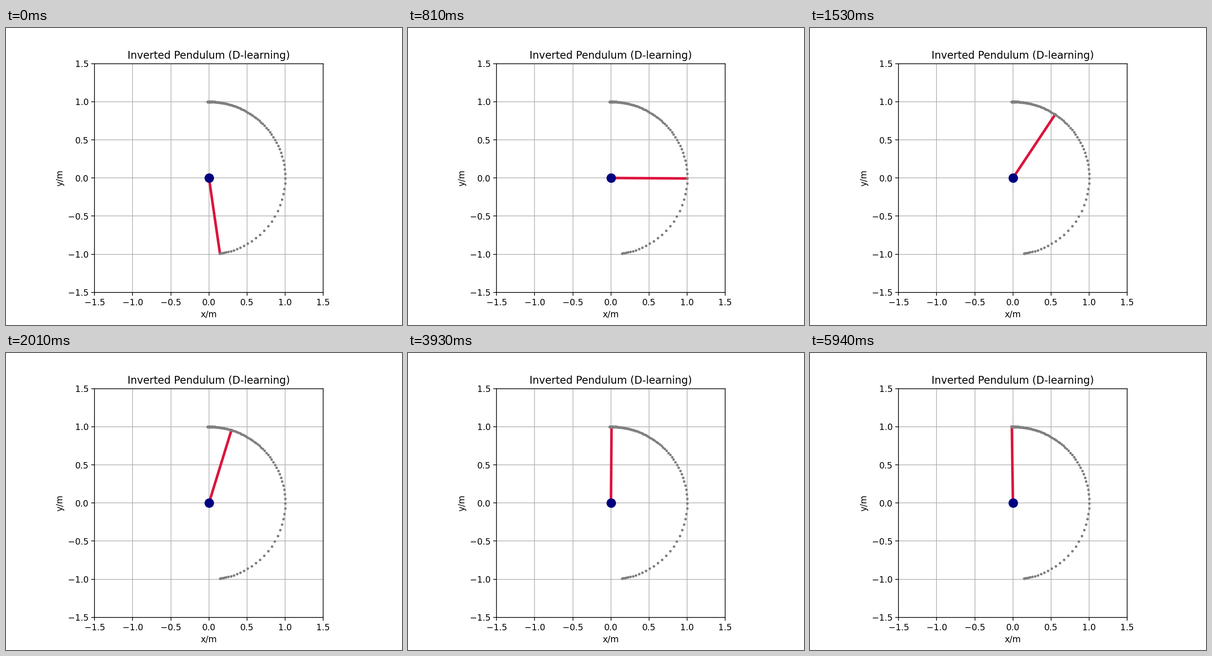
A matplotlib script that plays this animation: 864 px wide and 648 px high, repeating every 5970 ms.

```python
import numpy as np
import matplotlib.pyplot as plt
from matplotlib.animation import FuncAnimation

FRAMES = 199
INTERVAL = 30


def swing_up(k):
    """Angle from upright: constant torque first, then exponential settling."""
    push = 2.997 - 0.5 * 0.0046 * k**2
    settle = -0.016 + 0.6026 * np.exp(-0.0405 * (k - 51))
    blend = np.clip((k - 18) / 2, 0, 1)
    return (1 - blend) * push + blend * settle


theta = swing_up(np.arange(FRAMES))
x, y = np.sin(theta), np.cos(theta)

plt.rcParams["font.family"] = "DejaVu Sans"
fig, ax = plt.subplots(figsize=(6.4, 4.8), dpi=135)
ax.set_aspect("equal")
ax.set(xlim=(-1.5, 1.5), ylim=(-1.5, 1.5), xlabel="x/m", ylabel="y/m",
       title="Inverted Pendulum (D-learning)")
ax.set_xticks(np.arange(-1.5, 1.6, 0.5))
ax.set_yticks(np.arange(-1.5, 1.6, 0.5))
ax.grid()

rod, = ax.plot([0, x[0]], [0, y[0]], color="crimson", lw=3)
ax.plot(x, y, "o", color="gray", ms=2)
ax.plot(0, 0, "o", color="navy", ms=10)


def update(k):
    rod.set_data([0, x[k]], [0, y[k]])
    return rod,


anim = FuncAnimation(fig, update, frames=FRAMES, interval=INTERVAL,
                     repeat=True, repeat_delay=0)
plt.show()
```
